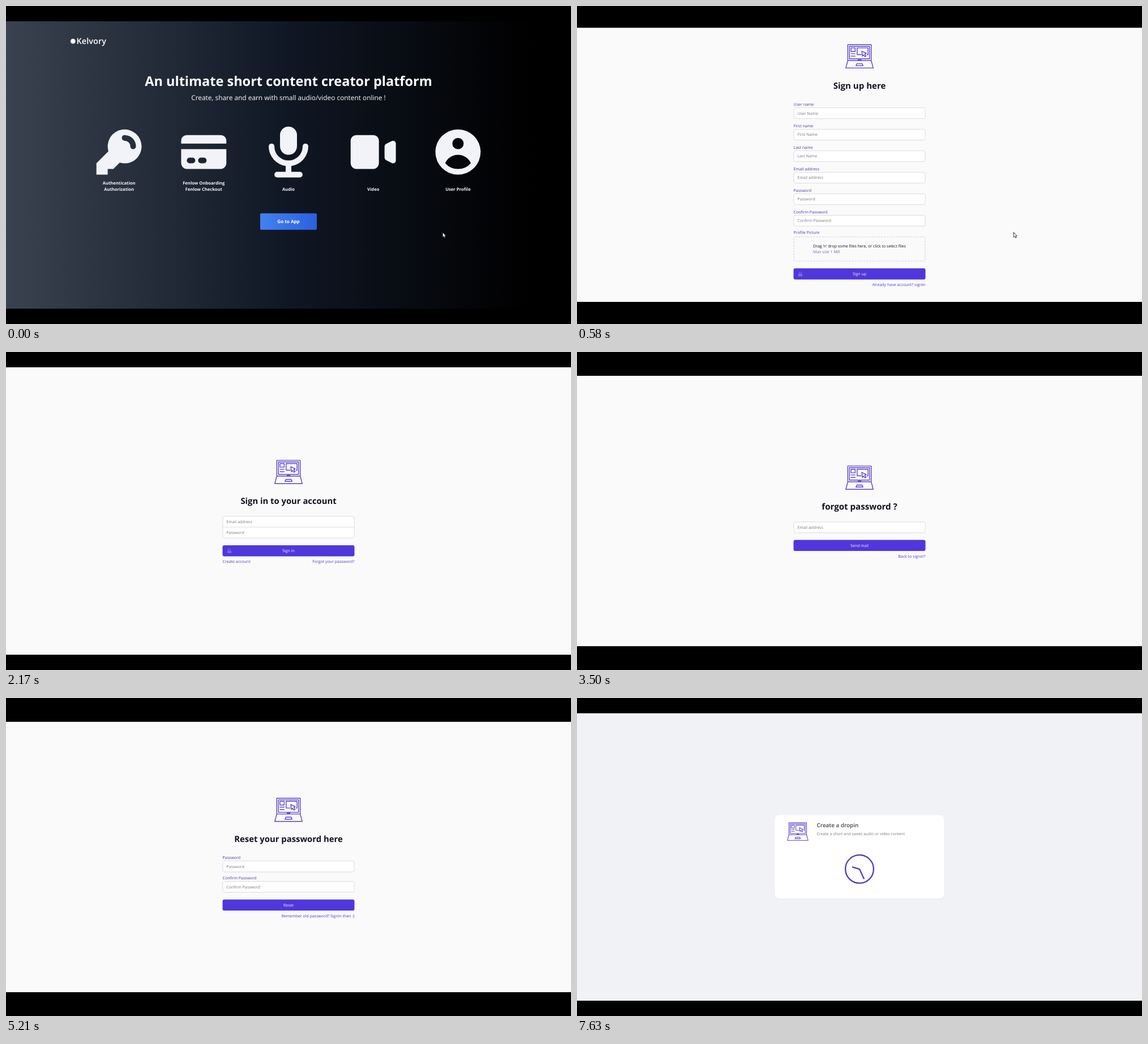
Write an HTML page that moves like this. It is 998x561 px and loops after 8 s.

```html
<!DOCTYPE html>
<html lang="en">
<head>
<meta charset="utf-8">
<title>App tour</title>
<style>
html, body { margin: 0; width: 100%; height: 100%; overflow: hidden; background: #000; }
svg { display: block; width: 998px; height: 561px; }
text { font-family: "Open Sans", "Noto Sans", sans-serif; text-rendering: geometricPrecision; white-space: pre; }
</style>
</head>
<body>
<svg id="stage" viewBox="0 0 998 561" xmlns="http://www.w3.org/2000/svg"></svg>
<script>
const LOOP = 8000;
const INDIGO = '#5037dc', LABEL = '#4a37ae', LINK = '#513dcb', INK = '#12131f', HINT = '#767981';

// ---- drawing helpers ----
const text = (x, y, s, { size = 7, fill = INK, weight = 400, anchor = 'start' } = {}) =>
  `<text x="${x}" y="${y}" font-size="${size}" fill="${fill}" font-weight="${weight}" text-anchor="${anchor}">${s}</text>`;
const mid = (y, s, o) => text(499, y, s, { anchor: 'middle', ...o });
const rect = (x, y, w, h, fill, r = 0, extra = '') =>
  `<rect x="${x}" y="${y}" width="${w}" height="${h}" rx="${r}" fill="${fill}" ${extra}/>`;
const at = (x, y, s, k = 1) => `<g transform="translate(${x} ${y}) scale(${k})">${s}</g>`;
const page = (top, bottom, fill) => rect(0, top, 998, bottom - top, fill);
const outline = (x, y, w, h) => rect(x, y, w, h, '#fff', 3, 'stroke="#d3d5da" stroke-width=".8"');
const icon = (d, fill) => `<path fill-rule="evenodd" fill="${fill}" d="${d}"/>`;

const SHAPES = {
  key: 'M18 8a6 6 0 01-7.743 5.743L10 14l-1 1-1 1H6v2H2v-4l4.257-4.257A6 6 0 1118 8zm-6-4a1 1 0 100 2 2 2 0 012 2 1 1 0 102 0 4 4 0 00-4-4z',
  card: 'M4 4a2 2 0 00-2 2v1h16V6a2 2 0 00-2-2H4zM18 9H2v5a2 2 0 002 2h12a2 2 0 002-2V9zM4 13a1 1 0 011-1h1a1 1 0 110 2H5a1 1 0 01-1-1zm5-1a1 1 0 100 2h1a1 1 0 100-2H9z',
  mic: 'M7 4a3 3 0 016 0v4a3 3 0 11-6 0V4zm4 10.93A7.001 7.001 0 0017 8a1 1 0 10-2 0A5 5 0 015 8a1 1 0 00-2 0 7.001 7.001 0 006 6.93V17H6a1 1 0 100 2h8a1 1 0 100-2h-3v-2.07z',
  video: 'M2 6a2 2 0 012-2h6a2 2 0 012 2v8a2 2 0 01-2 2H4a2 2 0 01-2-2V6zM14.553 7.106A1 1 0 0014 8v4a1 1 0 00.553.894l2 1A1 1 0 0018 13V7a1 1 0 00-1.447-.894l-2 1z',
  user: 'M18 10a8 8 0 11-16 0 8 8 0 0116 0zm-6-3a2 2 0 11-4 0 2 2 0 014 0zm-2 4a5 5 0 00-4.546 2.916A5.986 5.986 0 0010 16a5.986 5.986 0 004.546-2.084A5 5 0 0010 11z',
  lock: 'M5 9V7a5 5 0 0110 0v2a2 2 0 012 2v5a2 2 0 01-2 2H5a2 2 0 01-2-2v-5a2 2 0 012-2zm8-2v2H7V7a3 3 0 016 0z'
};

const LAPTOP = `<path fill="none" stroke="#5a45cc" stroke-width="1.4" stroke-linejoin="round" stroke-linecap="round"
  d="M4.3 29V1.1H45.7V29ZM7.2 4H42.8V26H7.2ZM9.9 6.7H17.4V13.1H9.9ZM10 16.9H17.4M10 21.2H17.4
  M28 18.5H20.8V6.7H40.1V18.5H38.5M29 12.4L37 16.2 34.4 17.5 36.6 20.9 34.6 22.2 32.3 19 30.2 21.2Z
  M22.5 27.7H27.7M4.3 29L.8 42.2H49.2L45.7 29M20.2 34.7H29.8L31.2 38.2H18.8Z"/>`;

const title = (y, s, size = 14.9) => mid(y, s, { size, weight: 700 });
const field = (y, hint) => outline(382.9, y, 232.2, 19.1) + text(389.3, y + 12, hint, { fill: HINT });
const label = (y, s) => text(382.6, y, s, { fill: LABEL });
const linkRight = (y, s) => text(615.4, y, s, { fill: LINK, anchor: 'end' });
const button = (y, s, locked) =>
  rect(382.5, y, 233, 19.6, INDIGO, 3) +
  (locked ? at(389.2, y + 4.8, icon(SHAPES.lock, '#7767ea'), .52) : '') +
  mid(y + 12.2, s, { fill: '#f1effd' });
const dropzone = (x, y, w, h, limit, fill, ink) =>
  rect(x, y, w, h, fill, 3, 'stroke="#cfd1d7" stroke-width="1.1" stroke-dasharray="3.12 2.08"') +
  text(x + 34, y + 18.3, "Drag 'n' drop some files here, or click to select files", { fill: ink }) +
  text(x + 34, y + 28.8, `Max size ${limit} MB`, { size: 7.1, fill: '#7564dc' });
const cursor = at(771.3, 399.2,
  '<path d="M0 0V8.8L2 7 3.5 10 4.9 9.4 3.5 6.5H5.9Z" fill="#fff" stroke="#111" stroke-width=".8"/>');

// ---- scenes ----
function landing() {
  const columns = [
    ['key', 'Authentication', 'Authorization'],
    ['card', 'Fenlow Onboarding', 'Fenlow Checkout'],
    ['mic', '', 'Audio'],
    ['video', '', 'Video'],
    ['user', '', 'User Profile']
  ];
  const white = { fill: '#fff', weight: 700 };
  return page(27, 534, 'url(#night)') +
    '<circle cx="118.3" cy="62.2" r="4.4" fill="#fff"/>' +
    text(124.6, 66.6, 'Kelvory', { ...white, size: 14.5, weight: 600 }) +
    mid(141.4, 'An ultimate short content creator platform', { ...white, size: 23.5 }) +
    mid(166.2, 'Create, share and earn with small audio/video content online !', { size: 11.9, fill: '#fff' }) +
    columns.map(([shape, upper, lower], i) => {
      const x = 199.6 + i * 149.7, o = { size: 7.65, fill: '#f2f4f8', weight: 700, anchor: 'middle' };
      return at(x - 49.9, 207.7, icon(SHAPES[shape], '#f1f3f8'), 4.99) +
        text(x, 315.3, upper, o) + text(x, 325.7, lower, o);
    }).join('') +
    rect(449, 365.8, 100, 28.9, 'url(#blue)', 2) +
    mid(383, 'Go to App', { ...white, size: 8.1 });
}

function signUp() {
  const rows = [['User name', 'User Name'], ['First name', 'First Name'], ['Last name', 'Last Name'],
    ['Email address', 'Email address'], ['Password', 'Password'], ['Confirm Password', 'Confirm Password']];
  return page(38.4, 522, '#fafafa') + at(474, 67.2, LAPTOP) + title(145.9, 'Sign up here', 15.05) +
    rows.map(([name, hint], i) => label(175.8 + i * 37.94, name) + field(179.5 + i * 37.94, hint)).join('') +
    label(401.8, 'Profile Picture') +
    dropzone(383.1, 407.3, 231.8, 42.7, 1, 'none', INK) +
    button(462.8, 'Sign up', true) + linkRight(494.3, 'Already have account? signin');
}

function signIn() {
  return page(27, 534, '#fafafa') + at(474, 190, LAPTOP) + title(268.4, 'Sign in to your account', 14.8) +
    outline(382.9, 289.9, 232.2, 38.2) + rect(383, 308.5, 232, .8, '#d3d5da') +
    text(389.3, 301.6, 'Email address', { fill: HINT }) + text(389.3, 320.8, 'Password', { fill: HINT }) +
    button(340.9, 'Sign in', true) +
    text(382.6, 372.4, 'Create account', { fill: LINK }) + linkRight(372.4, 'Forgot your password?');
}

function forgot() {
  return page(42, 519, '#fafafa') + at(474, 200, LAPTOP) + title(278.3, 'forgot password ?', 15.1) +
    field(299.8, 'Email address') + button(331.5, 'Send mail') + linkRight(363, 'Back to signin?');
}

function reset() {
  return page(42, 519, '#fafafa') + at(474, 175.6, LAPTOP) + title(253.9, 'Reset your password here', 14.85) +
    label(284, 'Password') + field(287.7, 'Password') +
    label(319.8, 'Confirm Password') + field(323.5, 'Confirm Password') +
    button(355.4, 'Reset') + linkRight(386.8, 'Remember old password? Signin then :)');
}

const card = (y, h) =>
  page(27, 534, '#f1f2f6') + rect(349.5, y + .9, 299, h, '#dfe1e6', 8) + rect(349.5, y, 299, h, '#fff', 8);
const cardHead = (y, weight) =>
  at(371, y, LAPTOP, .755) +
  text(423.6, y + 8.8, 'Create a dropin', { size: 9.9, fill: '#41424b', weight }) +
  text(423.6, y + 22.2, 'Create a short and sweet audio or video content', { size: 6.95, fill: '#777a84' });

function create() {
  const ink = '#45464f', pale = '#a2a5ad';
  const name = (y, s) => text(370, y, s, { fill: ink });
  const toggle = y => rect(370, y, 25, 14.6, '#d2d4da', 7.3) + `<circle cx="377.5" cy="${y + 7.3}" r="6.4" fill="#fff"/>`;
  const zone = (y, limit) => dropzone(370.6, y, 256.8, 42.7, limit, '#fff', ink);
  return card(33, 497.4) + cardHead(43.2, 500) +
    name(94.6, 'Name') + outline(370.4, 99.9, 257.2, 19.3) + text(378.6, 112, 'Dropin Name', { fill: pale }) +
    name(137.2, 'Description') + outline(370.4, 142.5, 257.2, 29.8) + text(378.6, 154.6, 'Dropin Description', { fill: pale }) +
    '<path d="M622.8 171.4L626.8 167.4M625 171.4L626.8 169.6" stroke="#777" stroke-width=".7"/>' +
    name(190.2, 'Paid / Free') + toggle(195.1) +
    name(227.8, 'Audio / Video') + toggle(232.6) +
    name(265.2, 'Thumbnail') + zone(272.7, 1) +
    rect(370.2, 325.8, 85.6, 23.6, '#dcdee3', 2) +
    rect(370.4, 324.5, 85.2, 23.3, '#fff', 2, 'stroke="#d9dbe2" stroke-width=".8"') +
    text(413, 338.5, 'Open Recorder', { size: 6.9, weight: 500, anchor: 'middle' }) +
    name(365.9, 'Audio Preview') + zone(373.6, 50) +
    name(434.5, 'Audio') + zone(442.2, 50) +
    '<path d="M413.8 504.8L420.2 511.2M420.2 504.8L413.8 511.2" stroke="#17181f" stroke-width="1.1" stroke-linecap="round"/>' +
    text(429.2, 511, 'Cancel', { size: 8.15 }) +
    rect(503, 495.6, 125, 24.9, INDIGO, 3) +
    text(565.5, 511, 'Create', { size: 8, fill: '#f1effd', anchor: 'middle' });
}

function loading() {
  return card(206.5, 147.8) + cardHead(219.3, 600) +
    '<g fill="none" stroke="#4f3bc4" stroke-width="2.3" stroke-linecap="round" stroke-linejoin="round">' +
    '<circle cx="499" cy="301.8" r="24.9"/><path d="M487 298.3L499 301.8 506.7 318.6"/></g>';
}

const SCENES = [
  [0, landing() + cursor],
  [580, signUp() + cursor],
  [1460, signUp()],
  [2170, signIn()],
  [3500, forgot()],
  [5130, reset()],
  [6330, create()],
  [7630, loading()]
];

const stage = document.getElementById('stage');
stage.innerHTML = `<defs>
  <linearGradient id="night"><stop offset="0" stop-color="#3a4250"/><stop offset=".5" stop-color="#101724"/>
    <stop offset=".9" stop-color="#010102"/><stop offset="1" stop-color="#000"/></linearGradient>
  <linearGradient id="blue"><stop offset="0" stop-color="#4381f0"/><stop offset="1" stop-color="#2b60df"/></linearGradient>
  </defs>` + rect(0, 0, 998, 561, '#000') +
  SCENES.map(([, art]) => `<g class="scene" display="none">${art}</g>`).join('');
const groups = [...stage.querySelectorAll('.scene')];

const start = performance.now();
let shown = -1;
function draw() {
  const t = (performance.now() - start) % LOOP;
  const now = SCENES.findLastIndex(([from]) => t >= from);
  if (now !== shown) {
    groups.forEach((g, i) => g.setAttribute('display', i === now ? 'inline' : 'none'));
    shown = now;
  }
  requestAnimationFrame(draw);
}
draw();
</script>
</body>
</html>
```
